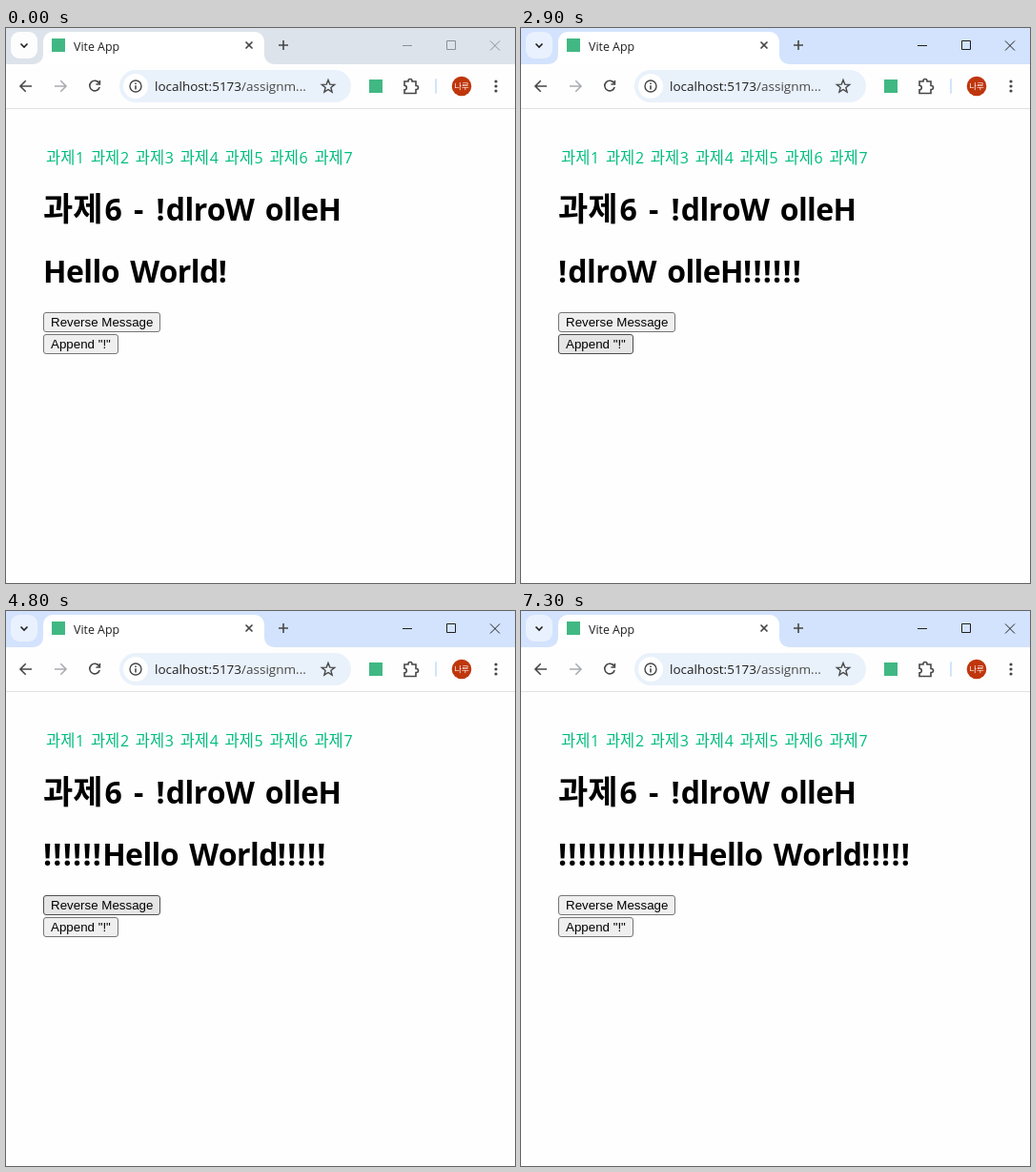
Recreate the animation shown at these times as an HTML page. Size 534 px wide and 582 px high, loop 7.8 s.

```html
<!DOCTYPE html>
<html lang="ko">
<head>
<meta charset="utf-8">
<title>Vite App</title>
<style>
  html, body { margin: 0; width: 100%; height: 100%; overflow: hidden; background: #fff; }
  svg { display: block; width: 534px; height: 582px; font-family: "Open Sans", "Noto Sans CJK KR", "Noto Sans CJK", sans-serif; }
  .line { fill: none; stroke: #474747; stroke-width: 1.6; }
  .thin { fill: none; stroke: #1f1f1f; stroke-width: 1; }
  .ko { font-family: "Noto Sans CJK KR", "Noto Sans CJK", sans-serif; }
  .head { font-size: 32px; font-weight: 700; font-kerning: none; letter-spacing: -.57px; word-spacing: 3.6px; }
  .bang { letter-spacing: 1.2px; }
  .nav { font-size: 16px; fill: #00bd7e; }
  .nav .ko { font-size: 16.5px; font-weight: 300; }
  .button { font: 13.333px "Liberation Sans", Arial, sans-serif; }
  .button rect { fill: #efefef; stroke: #767676; }
  .button.hover rect { fill: #e5e5e5; stroke: #4f4f4f; }
  .button.press rect { fill: #f5f5f5; stroke: #8d8d8d; }
  #strip { fill: #d3e3fd; }
  #search { fill: #e9f1fe; }
  .blur #strip { fill: #dde3ea; }
  .blur #search { fill: #fdfdfe; }
  .blur #controls { stroke: #8c8f93; }
</style>
</head>
<body>
<svg id="stage" viewBox="0 0 534 582">
  <rect width="534" height="582" fill="#fefefe"/>

  <!-- tab strip -->
  <rect id="strip" width="534" height="38"/>
  <rect id="search" x="5" y="4" width="28" height="28" rx="9"/>
  <path class="line" style="stroke:#1f1f1f" d="M15.5 16.5l3.5 3.5 3.5-3.5"/>
  <path fill="#fff" d="M29 38a10 10 0 0 0 10-10V14a10 10 0 0 1 10-10H261a10 10 0 0 1 10 10V28a10 10 0 0 0 10 10z"/>
  <rect x="48" y="11" width="14" height="14" fill="#41b883"/>
  <text x="71" y="24" font-size="12.4" fill="#1f1f1f">Vite App</text>
  <path class="line" d="M251.5 14.5l7 7m0-7l-7 7"/>
  <path class="line" d="M286 18h10m-5-5v10"/>
  <path id="controls" class="thin" d="M416 18.5h10M462.5 13.5h9v9h-9zM508 13.5l10 10m0-10l-10 10"/>

  <!-- toolbar -->
  <path class="line" d="M27 61H15m5.7-5.7L15 61l5.7 5.7"/>
  <path class="line" style="stroke:#a9acb0" d="M51 61h12m-5.7-5.7L63 61l-5.7 5.7"/>
  <path class="line" d="M97.6 57.7a5.3 5.3 0 1 0 .6 4.3M98.4 55v4h-4"/>
  <rect x="119" y="44" width="243" height="34" rx="17" fill="#e9f1fb"/>
  <circle cx="136" cy="61" r="13" fill="#fff"/>
  <circle class="line" style="stroke-width:1.4" cx="136" cy="61" r="6"/>
  <path class="line" d="M136 60.2v4.2M136 57.4v1.6"/>
  <text x="156" y="66" font-size="13.5" fill="#1f1f1f">localhost:5173<tspan fill="#474747">/assignm...</tspan></text>
  <path class="line" style="stroke-width:1.4" d="M338 54.5l1.8 4.6 4.9.2-3.8 3.1 1.2 4.8-4.1-2.7-4.1 2.7 1.2-4.8-3.8-3.1 4.9-.2z"/>
  <rect x="381" y="54" width="14" height="14" fill="#41b883"/>
  <path class="line" d="M418 56h4v-.5a2 2 0 0 1 4 0v.5h4v4.5h.5a2 2 0 0 1 0 4h-.5v4h-12v-3.6a2.3 2.3 0 0 0 0-4.6z"/>
  <rect x="450" y="53" width="2" height="16" rx="1" fill="#d3e3fd"/>
  <circle cx="478" cy="61" r="10.3" fill="#bf360c"/>
  <text class="ko" x="478" y="64" font-size="8.5" fill="#fff" text-anchor="middle">나루</text>
  <g fill="#474747"><circle cx="514" cy="56" r="1.6"/><circle cx="514" cy="61" r="1.6"/><circle cx="514" cy="66" r="1.6"/></g>
  <rect y="84" width="534" height="1" fill="#dfe2e6"/>

  <!-- page -->
  <g id="nav" class="nav"></g>
  <text class="ko" x="39" y="202" font-size="34" font-weight="700">과제</text>
  <text class="head" x="103.5" y="202">6</text>
  <text class="head" x="134" y="202">-</text>
  <text id="title" class="head" x="157.5" y="202"></text>
  <text id="message" class="head" x="39" y="267"></text>
  <g id="reverse" class="button">
    <rect x="39.5" y="298.5" width="122" height="20" rx="2.5"/>
    <text x="47" y="313">Reverse Message</text>
  </g>
  <g id="append" class="button">
    <rect x="39.5" y="321.5" width="78" height="20" rx="2.5"/>
    <text x="47" y="336">Append "!"</text>
  </g>
</svg>

<script>
const LOOP = 7800, FOCUS = 900;
const $ = id => document.getElementById(id);

// [ms, button under the pointer, what happens there]
const events = [
  [600, 'reverse'], [900, 'reverse', 'click'], [1400, 'reverse', 'click'],
  [1800, 'reverse', 'press'], [1900, 'reverse', 'click'],
  [2100, 'append'], [2200, 'append', 'click'], [2400, 'append', 'click'],
  [2500, 'append', 'click'], [2600, 'append', 'press'], [2700, 'append', 'click'],
  [2800, 'append', 'click'], [2900, 'append', 'click'],
  [3000, 'reverse'], [3100, 'reverse', 'click'], [3200, ''], [3300, 'append'],
  [3500, 'reverse'], [3700, 'append'], [3800, 'append', 'press'],
  [3900, 'append', 'click'], [4000, 'append', 'press'], [4100, 'append', 'click'],
  [4200, 'append', 'click'], [4300, 'append', 'click'],
  [4400, 'reverse'], [4500, ''], [4800, 'reverse'], [5200, 'reverse', 'click'],
  [5500, 'append'], [5600, 'append', 'click'], [5700, 'append', 'press'],
  [5800, 'append', 'click'], [5900, 'append', 'click'], [6000, 'append', 'click'],
  [6100, 'append', 'click'], [6200, 'append', 'click'], [6300, 'append', 'click'],
  [6400, ''], [6500, 'reverse', 'click'], [7300, '']
];

const actions = {
  reverse: s => [...s].reverse().join(''),
  append: s => s + '!'
};

function stateAt(ms) {
  const state = { text: 'Hello World!', target: '', mode: 'hover' };
  for (const [time, target, event] of events) {
    if (time > ms) break;
    state.target = target;
    state.mode = event === 'press' ? 'press' : 'hover';
    if (event === 'click') state.text = actions[target](state.text);
  }
  return state;
}

function setHeading(el, text) {
  if (el.dataset.text === text) return;
  el.dataset.text = text;
  el.innerHTML = text.replace(/!+/g, '<tspan class="bang">$&</tspan>');
}

function draw() {
  const ms = performance.now() % LOOP;
  const { text, target, mode } = stateAt(ms);
  $('stage').classList.toggle('blur', ms < FOCUS);
  setHeading($('message'), text);
  for (const id of ['reverse', 'append'])
    $(id).setAttribute('class', 'button ' + (id === target ? mode : ''));
  requestAnimationFrame(draw);
}

for (let i = 0; i < 7; i++) {
  const x = 42 + i * 46.9;
  $('nav').innerHTML += `<text class="ko" x="${x}" y="142">과제</text><text x="${x + 31}" y="142">${i + 1}</text>`;
}
setHeading($('title'), '!dlroW olleH');
draw();
</script>
</body>
</html>
```
